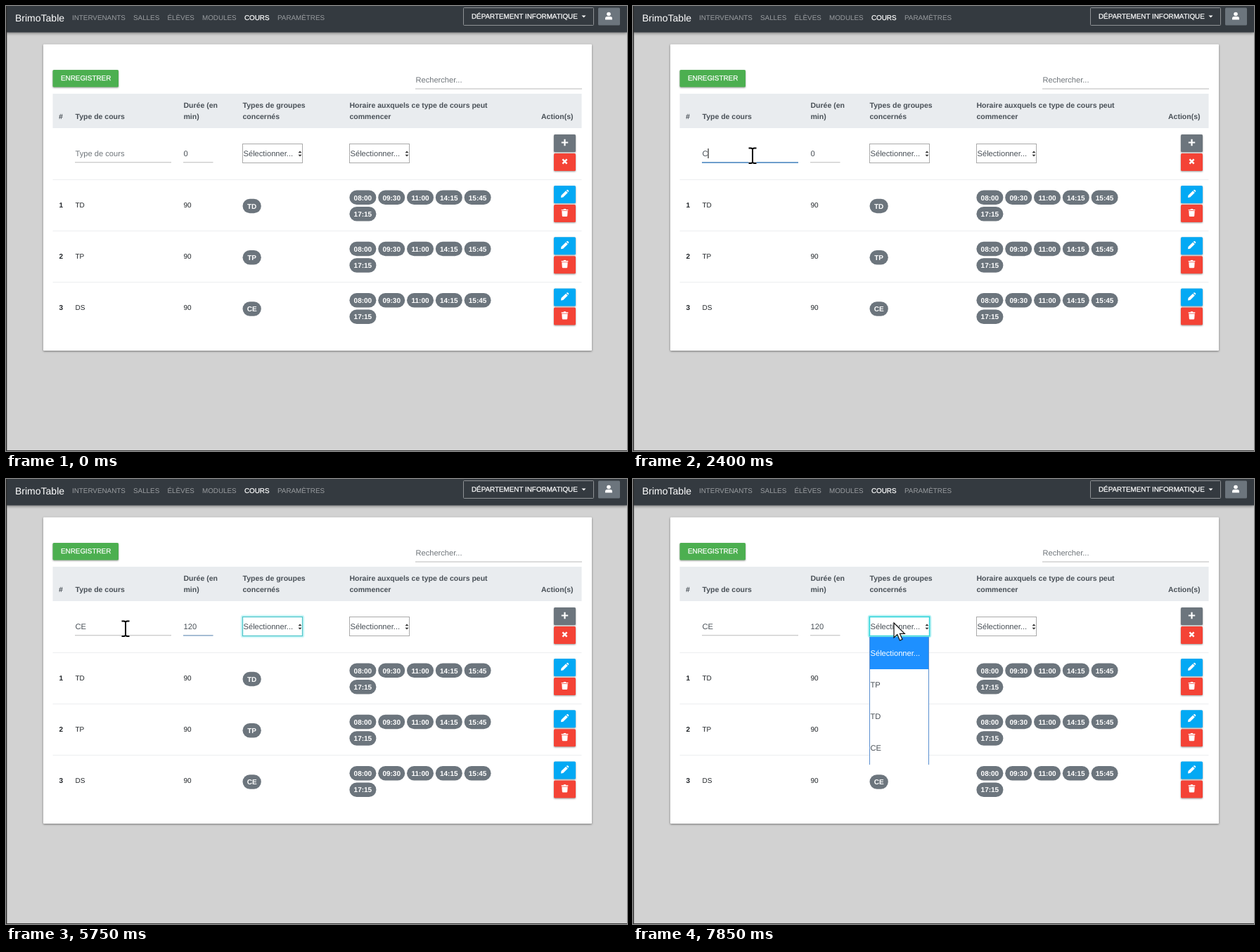
These frames come from a looping animation (883x634 px, 8000 ms). An HTML page:

```html
<!DOCTYPE html>
<html lang="fr">
<head>
<meta charset="utf-8">
<title>Types de cours</title>
<style>
html, body { margin: 0; width: 100%; height: 100%; overflow: hidden; background: #d2d2d2; }
svg { display: block; font-family: "Liberation Sans", Arial, sans-serif; text-rendering: geometricPrecision; }
.card { filter: drop-shadow(0 1px 1.5px rgba(0,0,0,.45)); }
.btn { filter: drop-shadow(0 1px 1px rgba(0,0,0,.4)); }
.bar { filter: drop-shadow(0 1px 2px rgba(0,0,0,.5)); }
.thin { stroke: #fff; stroke-width: .25; }
</style>
</head>
<body>
<svg id="stage" width="883" height="634" viewBox="0 0 883 634"></svg>
<script>
const LOOP = 8000;
const GREY = '#6c757d', RED = '#f44336', BLUE = '#03a9f4', INK = '#212529', FIELD = '#495057', HINT = '#6f757a';

const rect = (x, y, w, h, fill, extra = '') =>
  `<rect x="${x}" y="${y}" width="${w}" height="${h}" fill="${fill}" ${extra}/>`;
const text = (x, y, str, size, fill, extra = '') =>
  `<text x="${x}" y="${y}" font-size="${size}" fill="${fill}" ${extra}>${str}</text>`;
const path = (d, fill, extra = '') => `<path d="${d}" fill="${fill}" ${extra}/>`;
const group = (id, body) => `<g id="${id}">${body}</g>`;
const BOLD = 'font-weight="bold"';

const icons = {
  plus: path('M-4.7 0H4.7M0-4.7V4.7', 'none', 'stroke="#fff" stroke-width="2.2"'),
  cross: path('M-3.1-3.1L3.1 3.1M3.1-3.1L-3.1 3.1', 'none', 'stroke="#fff" stroke-width="2.4"'),
  pencil: path('M-5.5 5.5L-5 2.2L1.6-4.2L4.3-1.5L-2.3 5ZM2.3-4.9L3.2-5.6Q3.9-6 4.6-5.4L5.4-4.6Q6-3.9 5.5-3.2L4.9-2.3Z', '#fff'),
  trash: path('M-4.8-4.6H-2L-1.3-5.6H1.3L2-4.6H4.8V-3.2H-4.8ZM-4.2-2.5H4.2L3.7 4.5Q3.6 5.5 2.6 5.5H-2.6Q-3.6 5.5-3.7 4.5Z', '#fff'),
  user: '<circle cy="-2.7" r="2.8" fill="#fff"/>' + path('M-5 5.3V3.5Q-5 .8-2.2 .8H2.2Q5 .8 5 3.5V5.3Z', '#fff')
};
const iconButton = (y, fill, icon) =>
  rect(779, y, 31, 25, fill, 'rx="1.5" class="btn"') +
  `<g transform="translate(794.5 ${y + 11.5})">${icons[icon]}</g>`;

const pill = (x, y, w, label) =>
  rect(x, y, w, 20.5, GREY, 'rx="10.2"') +
  text(x + w / 2, y + 14, label, 10, '#fff', BOLD + ' text-anchor="middle"');

const arrows = (x, y, s) =>
  path(`M${x - s} ${y - 1.2}h${2 * s}l${-s} ${-s - .4}zM${x - s} ${y + 1.2}h${2 * s}l${-s} ${s + .4}z`, '#333');

const select = x =>
  rect(x + .5, 196.5, 85, 27, '#fff', 'stroke="#a9a9a9"') +
  text(x + 1.5, 214, 'Sélectionner...', 11.15, FIELD) + arrows(x + 82, 210.5, 2.5);

function navbar() {
  const links = [[94, 'INTERVENANTS'], [181, 'SALLES'], [229.5, 'ÉLÈVES'], [279, 'MODULES'], [339, 'COURS'], [386, 'PARAMÈTRES']];
  return rect(0, 0, 883, 37.5, '#343a40', 'class="bar"') +
    text(13, 21.5, 'BrimoTable', 14, '#fff') +
    links.map(([x, s]) => s === 'COURS'
      ? text(x, 20, s, 9.85, '#fff', 'class="thin"')
      : text(x, 20, s, 9.85, '#9a9da0')).join('') +
    rect(650.5, 2.5, 185, 25, 'none', 'stroke="#8f9295" rx="1"') +
    text(662, 18, 'DÉPARTEMENT INFORMATIQUE', 9.85, '#fff', 'class="thin"') +
    path('M818.5 13.5h6l-3 3z', '#fff') +
    rect(842, 2.5, 31, 25, GREY, 'rx="1.5"') +
    `<g transform="translate(857 14.2)">${icons.user}</g>`;
}

function tableHead() {
  const labels = [
    [75, 160.5, '#'], [98.5, 160.5, 'Type de cours'],
    [252.5, 144.5, 'Durée (en'], [252.5, 160.5, 'min)'],
    [336.5, 144.5, 'Types de groupes'], [336.5, 160.5, 'concernés'],
    [488.5, 144.5, 'Horaire auxquels ce type de cours peut'], [488.5, 160.5, 'commencer'],
    [761, 160.5, 'Action(s)']
  ];
  return rect(66.5, 125, 752, 49, '#e9ecef') +
    labels.map(([x, y, s]) => text(x, y, s, 10.5, FIELD, BOLD)).join('');
}

function row(i, name, kind) {
  const y = 247 + i * 73.2;
  const hours = ['08:00', '09:30', '11:00', '14:15', '15:45', '17:15'];
  return rect(66.5, Math.round(y), 752, 1, '#eceef0') +
    text(75.5, y + 40, i + 1, 10, INK, BOLD) + text(98.5, y + 40, name, 10, INK) +
    text(252.5, y + 40, '90', 10, INK) + pill(336.5, y + 27.8, 26.3, kind) +
    hours.map((h, k) => pill(488.4 + k % 5 * 40.8, y + (k < 5 ? 15.6 : 39), 38, h)).join('') +
    iconButton(y + 9, BLUE, 'pencil') + iconButton(y + 36, RED, 'trash');
}

const page =
  rect(0, 0, 883, 634, '#d2d2d2') + navbar() +
  rect(53, 54.5, 780, 436.5, '#fff', 'rx="1" class="card"') +
  rect(66.5, 91, 93.5, 24.5, '#4caf50', 'rx="1.5" class="btn"') +
  text(78, 106, 'ENREGISTRER', 9.9, '#fff', 'class="thin"') +
  text(582.5, 108.5, 'Rechercher...', 11.1, HINT) + rect(582, 117.5, 237, 1, '#b9b9b9') +
  tableHead() +
  rect(98, 222.3, 137, 1, '#b9b9b9') + rect(252, 222.3, 42.5, 1, '#b9b9b9') +
  rect(98, 222.3, 137, 1.5, '#4a8ac8', 'id="line1"') + rect(252, 222.3, 42.5, 1.5, '#4a8ac8', 'id="line2"') +
  select(336) + select(488) +
  iconButton(183, GREY, 'plus') + iconButton(210, RED, 'cross') +
  [['TD', 'TD'], ['TP', 'TP'], ['DS', 'CE']].map((r, i) => row(i, ...r)).join('') +
  group('spinner', rect(284, 204, 10, 13, '#f0f0f0') + arrows(289, 210.5, 3)) +
  rect(251.8, 203, 7.2, 14, '#3390ff', 'id="mark"') +
  text(98.5, 214, '', 11.15, HINT, 'id="type"') + text(252.5, 214, '', 11.15, FIELD, 'id="time"') +
  rect(0, 203, 1, 14, '#000', 'id="caret"') +
  group('glow',
    rect(335.5, 195.5, 87, 29, 'none', 'stroke="#7fe6ea" stroke-opacity=".45" stroke-width="4" rx="2"') +
    rect(336.3, 196.3, 85.4, 27.4, 'none', 'stroke="#35d5da" stroke-width="1.6"')) +
  group('list',
    rect(336, 225, 85, 182, '#fff') + rect(336.5, 225, 84, 46, '#1e90ff') +
    rect(336, 225, 1, 182, '#5b8fd0') + rect(420, 225, 1, 182, '#5b8fd0') +
    ['Sélectionner...', 'TP', 'TD', 'CE'].map((s, i) =>
      text(337.5, 252 + i * 45, s, 11.15, i ? FIELD : '#fff')).join('')) +
  group('arrow', path('M0 0V21L4.8 16.6L8.4 25L12 23.4L8.4 15.4H15.3Z', '#fff', 'stroke="#111" stroke-width="1.2"')) +
  group('beam', ['#fff', '#000'].map((c, i) =>
    path('M-5.5-10.5H-2L0-9.5L2-10.5H5.5M0-9.5V10M-5.5 11H-2L0 10L2 11H5.5', 'none',
      `stroke="${c}" stroke-width="${i ? 2 : 3.4}"`)).join('')) +
  rect(0, 0, 1.3, 634, '#2b2b2b') + rect(0, 633, 883, 1, '#3a3a3a');

document.getElementById('stage').innerHTML = page;
const el = id => document.getElementById(id);
const show = (id, on) => el(id).setAttribute('visibility', on ? 'visible' : 'hidden');
const ramp = (t, a, b) => Math.min(1, Math.max(0, (t - a) / (b - a)));
const at = (steps, t) => steps.findLast(s => t >= s[0]);

// [time, x, y]: the pointer jumps from one place to the next
const pointer = [
  [220, 464, 474], [310, 272, 368], [620, 262, 352], [700, 243, 320], [780, 222, 288],
  [850, 204, 258], [920, 190, 240], [1000, 186, 236], [1080, 183, 232], [1160, 180, 228],
  [1240, 175, 219], [1320, 171, 214], [1400, 170, 213], [6910, 205, 219], [6990, 228, 236],
  [7070, 248, 246], [7150, 270, 248], [7220, 290, 243], [7300, 308, 234], [7380, 326, 222],
  [7460, 342, 210], [7540, 356, 199], [7620, 365, 192], [7690, 370, 188], [7770, 371, 205]
];
const typed = [[0, 'Type de cours'], [2400, 'C'], [2480, 'CE']];
const minutes = [[0, '0'], [4270, '1'], [4970, '12'], [5140, '120']];
// [time, x], x = 0 while the caret is off
const carets = [[0, 0], [1550, 98.5], [2170, 0], [2400, 106.5], [2480, 114.5], [3020, 0],
  [4270, 258.3], [4880, 0], [4970, 264.5], [5140, 270.5], [5670, 0]];

function draw(t) {
  const pos = at(pointer, t), beam = t >= 1240 && t < 6990;
  show('arrow', pos && !beam);
  show('beam', pos && beam);
  if (pos) el(beam ? 'beam' : 'arrow').setAttribute('transform', `translate(${pos[1]} ${pos[2]})`);

  el('type').textContent = at(typed, t)[1];
  el('type').setAttribute('fill', t < 2400 ? HINT : FIELD);
  el('time').textContent = at(minutes, t)[1];
  const marked = t >= 3020 && t < 4270;
  el('time').setAttribute('fill', marked ? '#fff' : FIELD);
  show('mark', marked);
  show('spinner', t >= 3020 && t < 5670);

  const x = at(carets, t)[1];
  show('caret', x);
  el('caret').setAttribute('x', x);

  el('line1').setAttribute('opacity', ramp(t, 1650, 1940) - ramp(t, 3020, 3340));
  el('line2').setAttribute('opacity', ramp(t, 3020, 3340) - ramp(t, 5670, 5830));
  el('glow').setAttribute('opacity', ramp(t, 5600, 5830));
  show('list', t >= 7850);
}

function tick() {
  draw(performance.now() % LOOP);
  requestAnimationFrame(tick);
}
tick();
</script>
</body>
</html>
```
